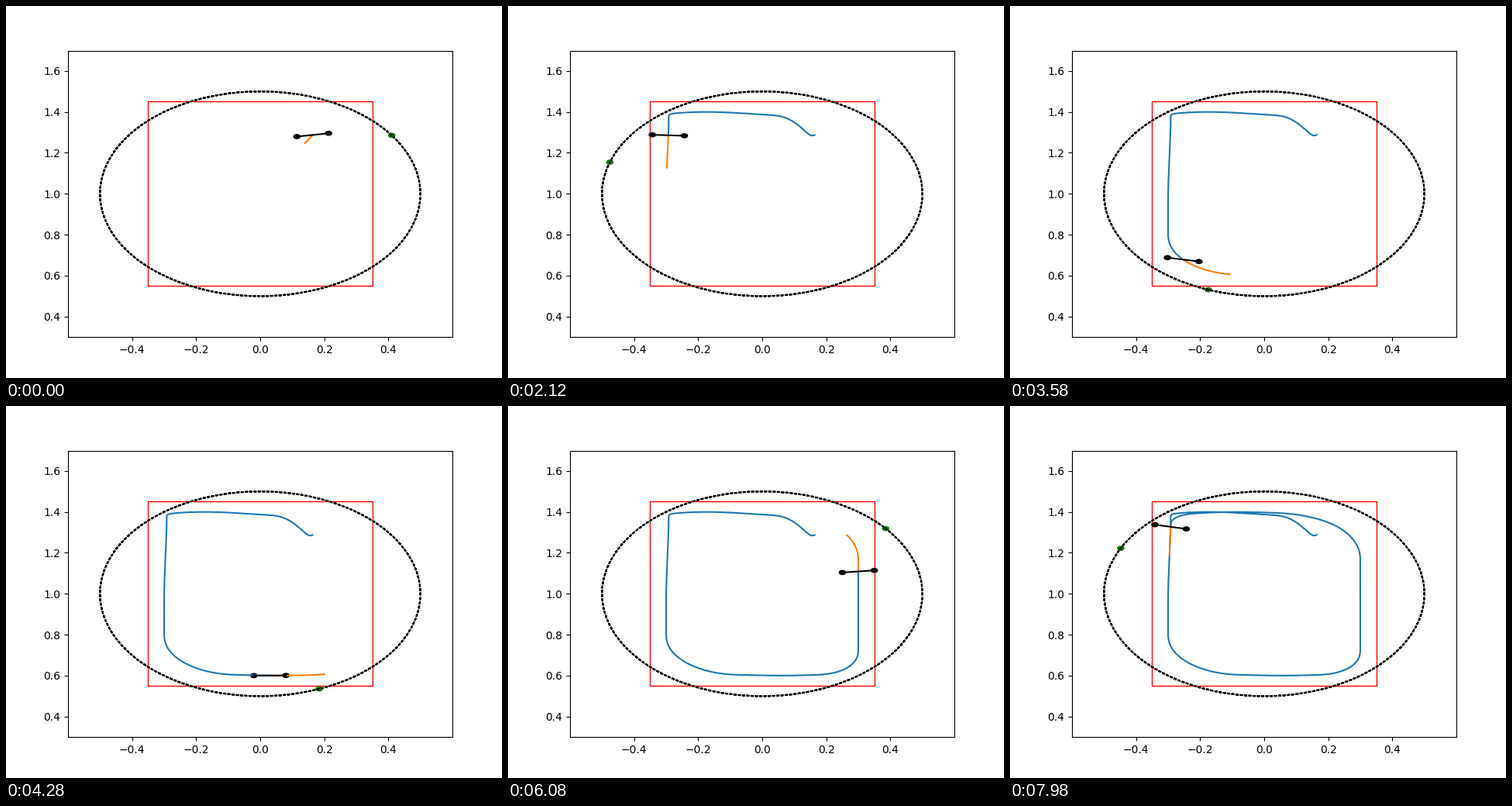
Recreate the animation shown at these times as a matplotlib script. Size 640 px wide and 480 px high, loop 8 s.

```python
import numpy as np
import matplotlib.pyplot as plt
from matplotlib.animation import FuncAnimation
from matplotlib.patches import Circle, Rectangle

FRAMES, STEP = 400, 20          # interval in ms
AHEAD = 20                      # steps shown by the prediction
ARM = 0.05                      # half length of the body
LAP = 6.0                       # seconds per round of the goal
PAD = 10                        # extra samples on each side for the blur


def ease(t, start, end):
    u = np.clip((t - start) / (end - start), 0, 1)
    return u * u * (3 - 2 * u)


def travel(t, origin, moves):
    """Sum of eased moves (start, end, distance), softened a little."""
    v = origin + sum(d * ease(t, a, b) for a, b, d in moves)
    w = np.hanning(2 * PAD // 2 + 1)
    return np.convolve(v, w / w.sum(), 'same')[PAD:-PAD]


def bump(t, peak, width, height):
    return height * np.exp(-0.5 * ((t - peak) / width) ** 2)


def later(moves):
    return [(a + LAP, b + LAP, d) for a, b, d in moves]


t = np.arange(FRAMES + AHEAD) * STEP / 1000
wide = np.arange(-PAD, FRAMES + AHEAD + PAD) * STEP / 1000

drift = [(1.9, 2.9, -.008)]                       # along the left side
down = [(1.25, 1.85, -.015), (1.57, 4.03, -.775)]
px = travel(wide, .1645, [
    (-.1, .6, -.012), (.38, 1.7, -.4445),         # to the left
    *drift, (3.25, 5.18, .6),                     # to the right
    (6.23, 7.93, -.592), *later(drift)])
py = travel(wide, 1.2875, [
    (0, .3, -.003), (.43, .8, .095), (.65, 1.25, .0205),
    *down, (3.6, 4.4, -.01),
    (4.3, 5.1, .012), (4.62, 7, .745),            # back to the top
    (6.1, 6.7, .03), (6.6, 7.3, .013), *later(down)])

# The body leans into each change of horizontal speed
lean = [(.3, .3, 15), (1.4, .35, -22), (3.42, .2, -15),
        (4.88, .22, 20), (6.55, .27, 27), (7.6, .42, -18)]
tilt = np.radians(sum(bump(t, *b) for b in lean))

fig, ax = plt.subplots(figsize=(6.4, 4.8), dpi=100)
ax.set_xlim(-0.5999, 0.5999)
ax.set_ylim(0.3, 1.6993)

ax.add_patch(Rectangle((-0.35, 0.55), 0.7, 0.9, fill=False, ec='r', lw=1))
# several rounds on top of each other make the dots denser
phi = np.radians(np.arange(0, 5 * 360, 1.2))
ax.plot(0.5 * np.cos(phi), 1 + 0.5 * np.sin(phi), 'k:')

goal = ax.add_patch(Circle((0, 1), 0.01, color='g'))
tips = [ax.add_patch(Circle((0, 1), 0.01, color='k')) for _ in range(2)]
trail, = ax.plot([], [], color='C0')
plan, = ax.plot([], [], color='C1')
body, = ax.plot([], [], color='k')

reach = np.linspace(0, 1, AHEAD + 1)


def update(i):
    a = np.radians(34.8) + 2 * np.pi * t[i] / LAP
    goal.center = 0.5 * np.cos(a), 1 + 0.5 * np.sin(a)

    trail.set_data(px[:i + 1], py[:i + 1])
    ahead = slice(i, i + AHEAD + 1)
    # the first predictions sag before they settle
    sag = np.exp(-t[i] / 0.1) * reach
    plan.set_data(px[ahead] - 0.015 * sag, py[ahead] - 0.037 * sag)

    dx, dy = ARM * np.cos(tilt[i]), ARM * np.sin(tilt[i])
    xs, ys = px[i] + np.array([-dx, dx]), py[i] + np.array([-dy, dy])
    body.set_data(xs, ys)
    for tip, x, y in zip(tips, xs, ys):
        tip.center = x, y
    return goal, *tips, trail, plan, body


anim = FuncAnimation(fig, update, frames=FRAMES, interval=STEP,
                     repeat=True, repeat_delay=0)
plt.show()
```
